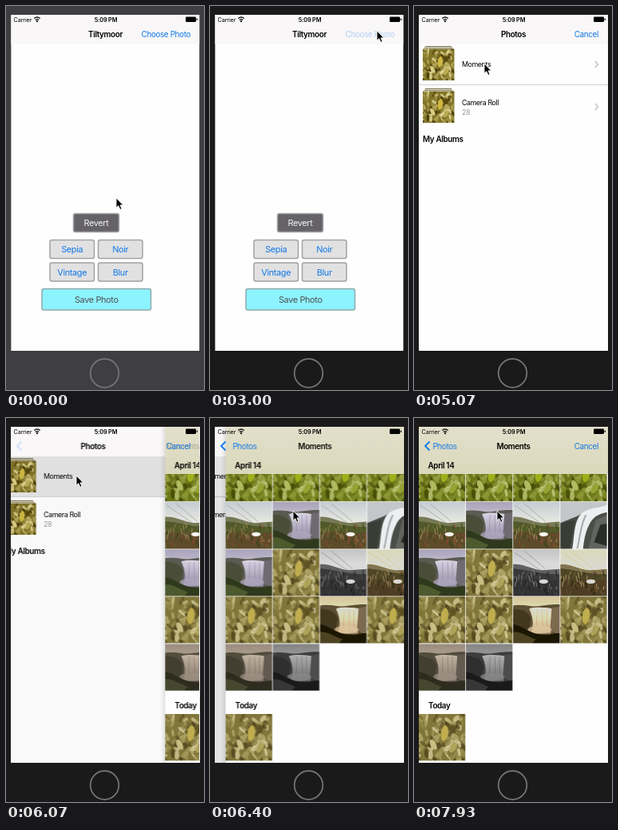
An HTML page for the animation above (8000 ms loop, 248x480 px).

```html
<!DOCTYPE html>
<html lang="en">
<head>
<meta charset="utf-8">
<title>Photo picker</title>
<style>
  html, body { margin: 0; width: 100%; height: 100%; overflow: hidden; background: #1a1a1b; }
  svg { display: block; }
  #stage { width: 248px; height: 480px; }
  text {
    font: 9.9px Inter, "Liberation Sans", sans-serif;
    letter-spacing: -.36px;
    dominant-baseline: central;
    white-space: pre;
  }
  .mid { text-anchor: middle; }
  .end { text-anchor: end; }
  .bold { font-weight: 600; }
  .link { fill: #1279e6; }
  .small { font-size: 7.3px; letter-spacing: -.15px; }
  .item { font-size: 8.8px; }
  .btn { font-size: 10.9px; letter-spacing: -.35px; }
  .soft { filter: blur(.7px); }

  .anim { animation: 8s infinite cubic-bezier(.25, .4, .35, 1); }
  #bezel { animation-name: focus; }
  #choose { animation-name: press; }
  #sheet { animation-name: present; }
  #row { animation-name: select; }
  #list { animation-name: recede; }
  #dim { animation-name: dim; }
  #detail { animation-name: push; }
  #heading { animation-name: heading; }
  #heading .bold { animation-name: out; }
  #heading .link { animation-name: in; }
  #moments { animation-name: moments; }
  #back { animation-name: back; }
  #cancel { animation-name: cancel; }
  #cursor { animation-name: cursor; animation-timing-function: ease-in-out; }

  @keyframes focus { 0%, 31.61% { fill: #3f3e41 } 31.62%, 100% { fill: #1a1a1b } }
  @keyframes press { 0%, 37.49% { opacity: 1 } 37.5%, 42.8% { opacity: .3 } 44.5%, 100% { opacity: 1 } }
  @keyframes present { 0%, 42.81% { transform: translateY(421px) } 49.81%, 100% { transform: translateY(0) } }
  @keyframes select { 0%, 72.49% { opacity: 0 } 72.5%, 76.3% { opacity: 1 } 80%, 100% { opacity: 0 } }
  @keyframes recede { 0%, 75.19% { transform: translateX(0) } 82.19%, 100% { transform: translateX(-71px) } }
  @keyframes dim { 0%, 75.19% { opacity: 0 } 82.19%, 100% { opacity: .11 } }
  @keyframes push {
    0%, 75.18% { transform: translateX(236px); opacity: 0 }
    75.19% { transform: translateX(236px); opacity: 1 }
    82.19%, 100% { transform: translateX(0); opacity: 1 }
  }
  @keyframes heading { 0%, 75.19% { transform: translateX(0) } 82.19%, 100% { transform: translateX(-85.5px) } }
  @keyframes out { 0%, 76.2% { opacity: 1 } 78.5%, 100% { opacity: 0 } }
  @keyframes in { 0%, 76.2% { opacity: 0 } 78.5%, 100% { opacity: 1 } }
  @keyframes moments {
    0%, 75.19% { transform: translateX(118px); opacity: 0 }
    82.19%, 100% { transform: translateX(0); opacity: 1 }
  }
  @keyframes back { 0%, 75.5% { opacity: 0 } 79.5%, 100% { opacity: 1 } }
  @keyframes cancel { 0%, 76% { opacity: 1 } 78.5%, 80.3% { opacity: 0 } 84%, 100% { opacity: 1 } }
  @keyframes cursor {
    0%, 5% { transform: translate(138px, 240px) }
    14.1%, 49% { transform: translate(209px, 31px) }
    56.6%, 76.3% { transform: translate(88px, 72px) }
    79.8%, 100% { transform: translate(104px, 116px) }
  }
</style>
</head>
<body>
<svg id="stage" viewBox="0 0 248 480">
  <defs>
    <clipPath id="screen"><rect x="6.4" y="11" width="235.8" height="420"/></clipPath>
    <linearGradient id="tint" x2="0" y2="1"><stop stop-color="#e2e0cb"/><stop offset="1" stop-color="#dad8bb"/></linearGradient>
    <linearGradient id="shade"><stop stop-opacity="0"/><stop offset="1" stop-opacity=".1"/></linearGradient>
    <linearGradient id="sky" x2="0" y2="1"><stop stop-color="#bcc8d0"/><stop offset=".5" stop-color="#efece4"/></linearGradient>
    <linearGradient id="dusk" x2="0" y2="1"><stop stop-color="#a39db4"/><stop offset=".4" stop-color="#c9c3d6"/></linearGradient>
    <linearGradient id="water" x2="0" y2="1"><stop stop-color="#d9d4e4"/><stop offset="1" stop-color="#938ba3"/></linearGradient>

    <symbol id="leaf" viewBox="0 0 58 58"><g id="foliage" class="soft">
      <rect x="-5" y="-5" width="68" height="68" fill="#81763a"/>
    </g></symbol>

    <symbol id="field" viewBox="0 0 58 58"><g id="meadow" class="soft">
      <rect x="-5" y="-5" width="68" height="68" fill="url(#sky)"/>
      <path d="M2 4 34 26M14 2 40 24" stroke="#9c9d96" stroke-width=".7"/>
      <path d="M-5 19C12 16 22 25 36 26L63 24V63H-5Z" fill="#757955"/>
      <path d="M-5 24C14 23 24 31 63 31V63H-5Z" fill="#515829"/>
      <path d="M-5 40C18 33 36 42 63 37V63H-5Z" fill="#5d4b2a"/>
    </g></symbol>

    <symbol id="fall" viewBox="0 0 58 58"><g class="soft">
      <rect x="-5" y="-5" width="68" height="68" fill="url(#dusk)"/>
      <path d="M-5 12C12 8 20 13 30 12S48 9 63 10V63H-5Z" fill="#5a5b52"/>
      <path d="M20 15C30 12 42 14 49 15L47 46H22C26 34 25 26 20 15Z" fill="url(#water)"/>
      <path d="M30 16 29 40M36 16 37 42M42 16 42 38" stroke="#8f88a0" stroke-opacity=".6"/>
      <path d="M-5 15C10 15 19 18 22 27L19 47-5 50Z" fill="#4a4e38"/>
      <path d="M48 14 63 12V50L46 42Z" fill="#6f6a72"/>
      <ellipse cx="33" cy="41" rx="15" ry="5" fill="#b0a8bd" opacity=".7"/>
      <path d="M-5 34C10 34 18 45 33 47S50 44 63 46V63H-5Z" fill="#2f391c"/>
      <path d="M-5 44C10 42 18 50 28 53L20 63H-5Z" fill="#4c5a2e"/>
    </g></symbol>

    <symbol id="cascade" viewBox="0 0 58 58"><g class="soft">
      <rect x="-5" y="-5" width="68" height="68" fill="#4b4d48"/>
      <path d="M-5-5H63V12C44 6 32 10 22 17L-5 28Z" fill="#c3c7c9"/>
      <path d="M26 14C38 6 48 8 63 2V12C46 14 40 20 36 28S29 46 28 63H14C18 44 16 26 26 14Z" fill="#eceeef"/>
      <path d="M32 16C25 28 25 42 21 58" fill="none" stroke="#a4a8aa" stroke-width="2"/>
      <path d="M-5 28 18 22 11 63H-5Z" fill="#3a3c36"/>
      <path d="M44 22 63 15V63H34Z" fill="#62645f"/>
      <path d="M50 28 63 26V56L42 50Z" fill="#2a2c27"/>
    </g></symbol>

    <g id="stack">
      <path d="M14 50.5H47M12.5 52.3H48.5" stroke="#77704a"/>
      <use href="#leaf" x="11" y="53.5" width="39.5" height="39.5" style="filter:contrast(1.25)"/>
    </g>
    <path id="more" d="M227 69l3.4 4-3.4 4" fill="none" stroke="#bdbdc2" stroke-width="1.3"/>
  </defs>

  <rect id="bezel" class="anim" width="248" height="480"/>
  <circle cx="123.5" cy="459" r="17.8" fill="none" stroke="#777679" stroke-width="1.7"/>

  <g clip-path="url(#screen)">
    <rect x="6" y="11" width="237" height="420" fill="#fefefe"/>
    <rect x="6" y="11" width="237" height="37" fill="#f9f7f8"/>
    <text class="mid bold" x="124.5" y="35">Tiltymoor</text>
    <text id="choose" class="anim link end" x="231" y="35">Choose Photo</text>
    <g id="buttons"></g>

    <g id="sheet" class="anim">
      <rect x="6" y="11" width="237" height="420" fill="#fefefe"/>
      <g id="list" class="anim">
        <rect id="row" class="anim" x="6" y="48" width="308" height="50" fill="#e4e4e5"/>
        <path d="M6 98.5H314" stroke="#d2d2d6"/>
        <use href="#stack"/>
        <use href="#stack" y="53"/>
        <text class="item" x="60" y="72">Moments</text>
        <text class="item" x="60" y="120.5">Camera Roll</text>
        <text class="item" x="60" y="132.5" fill="#9a9a9e">28</text>
        <text class="bold" x="11" y="165.5">My Albums</text>
        <use href="#more"/>
        <use href="#more" y="53"/>
      </g>
      <rect id="dim" class="anim" x="6" y="48" width="237" height="383"/>
      <rect x="6" y="11" width="237" height="37" fill="#f9f7f8"/>
      <g id="detail" class="anim">
        <rect y="11" width="6" height="420" fill="url(#shade)"/>
        <rect x="6" y="11" width="237" height="420" fill="#fefefe"/>
        <g id="grid"></g>
        <rect x="6" y="11" width="237" height="59" fill="url(#tint)"/>
        <text class="bold" x="17.5" y="59">April 14</text>
        <text class="bold" x="18" y="358.5">Today</text>
      </g>
      <path id="back" class="anim" d="M19.5 29.5 14 35l5.5 5.5" fill="none" stroke="#1279e6" stroke-width="1.8"/>
      <g id="heading" class="anim">
        <text class="anim mid bold" x="124.5" y="35">Photos</text>
        <text class="anim mid link" x="124" y="35">Photos</text>
      </g>
      <text id="moments" class="anim mid bold" x="124.5" y="35">Moments</text>
      <text id="cancel" class="anim link end" x="231" y="35">Cancel</text>
    </g>

    <text class="small" x="9.5" y="17">Carrier</text>
    <g fill="none" stroke="#111" stroke-width="1.3">
      <path d="M35.2 15.6Q39 12.4 42.8 15.6M36.8 17.5Q39 15.7 41.2 17.5"/>
      <circle cx="39" cy="19.2" r=".5"/>
    </g>
    <text class="small mid bold" x="125" y="17">5:09 PM</text>
    <rect x="225" y="13.6" width="13" height="6.4" rx="1.2"/>
    <rect x="238.6" y="15.6" width="1.2" height="2.4" rx=".5"/>
  </g>

  <g id="cursor" class="anim">
    <path d="M0 0V12.2L2.8 9.7 4.9 14.4 7 13.5 5 8.9H8.8Z" stroke="#fff" stroke-width=".9"/>
  </g>
</svg>

<script>
const SVG = 'http://www.w3.org/2000/svg';
const $ = id => document.getElementById(id);

function add(parent, tag, attrs, text) {
  const el = document.createElementNS(SVG, tag);
  for (const key in attrs) el.setAttribute(key, attrs[key]);
  if (text) el.textContent = text;
  parent.append(el);
}

let seed = 7;
function rand(min, max) {
  seed = (seed * 16807) % 2147483647;
  return min + (max - min) * seed / 2147483647;
}

// Buttons
function button(label, x, y, width, height, fill, color, stroke = '#a2a2a6') {
  add($('buttons'), 'rect', { x, y, width, height, rx: 2.5, fill, stroke, 'stroke-width': 1.5 });
  add($('buttons'), 'text', { x: x + width / 2, y: y + height / 2, class: 'btn mid', fill: color }, label);
}
button('Revert', 84.5, 259.5, 57, 23, '#656368', '#f2f2f2');
['Sepia', 'Noir', 'Vintage', 'Blur'].forEach((label, i) =>
  button(label, 55 + i % 2 * 60.5, 292.5 + (i >> 1) * 28.5, 55.5, 23, '#e1e1e2', '#1279e6'));
button('Save Photo', 45, 353.5, 136.5, 26.5, '#8df3ff', '#505054', '#8fa9ad');

// Foliage
const greens = ['#d8cf9c', '#a3985a', '#5d5224', '#4c421a', '#8f8446', '#b9ae72'];
function leaf(cx, cy, rx, ry, angle, fill, opacity) {
  add($('foliage'), 'ellipse', { cx, cy, rx, ry, fill, opacity, transform: `rotate(${angle} ${cx} ${cy})` });
}
for (let i = 0; i < 110; i++) {
  leaf(rand(0, 58), rand(0, 58), rand(1.2, 3.2), rand(3, 7), rand(-65, 65), greens[i % 6], .75);
}
leaf(32, 24, 4.5, 10, 8, '#bfad4e', 1);
leaf(18, 38, 3.5, 7, -30, '#d0c68c', .9);
leaf(43, 42, 3.5, 7, 35, '#b5a85e', .9);

// Meadow
for (let i = 0; i < 70; i++) {
  const x = rand(0, 58), y = rand(32, 58);
  add($('meadow'), 'path', {
    d: `M${x} ${y}l${rand(-3, 3)} ${rand(-8, -3)}`,
    stroke: ['#8d4a32', '#37411c', '#a08a58', '#5c6a2e'][i % 4], 'stroke-width': 1
  });
}
add($('meadow'), 'ellipse', { cx: 38, cy: 40, rx: 5.5, ry: 2.6, fill: '#fbf9f2' });

// Photo grid
const photos = {
  L: ['leaf', 'none'],
  V: ['leaf', 'hue-rotate(14deg) saturate(1.5) brightness(.95)'],
  F: ['field', 'none'],
  G: ['field', 'grayscale(1) contrast(1.35) brightness(.85)'],
  S: ['field', 'sepia(.75) contrast(1.35) brightness(.85)'],
  P: ['fall', 'none'],
  T: ['fall', 'sepia(.8) contrast(1.5) brightness(.85)'],
  B: ['fall', 'sepia(.6) brightness(.75)'],
  N: ['fall', 'grayscale(1) contrast(1.25) brightness(.75)'],
  W: ['cascade', 'none']
};
function photo(code, col, y) {
  const [name, filter] = photos[code];
  add($('grid'), 'use', { href: '#' + name, x: 6 + col * 59.1, y, width: 58.3, height: 58.3, style: 'filter:' + filter });
}
['VVVV', 'FPFW', 'PLGS', 'LLTL', 'BN'].forEach((row, r) =>
  [...row].forEach((code, col) => photo(code, col, 46 + r * 59.1)));
photo('L', 0, 370);
</script>
</body>
</html>
```
